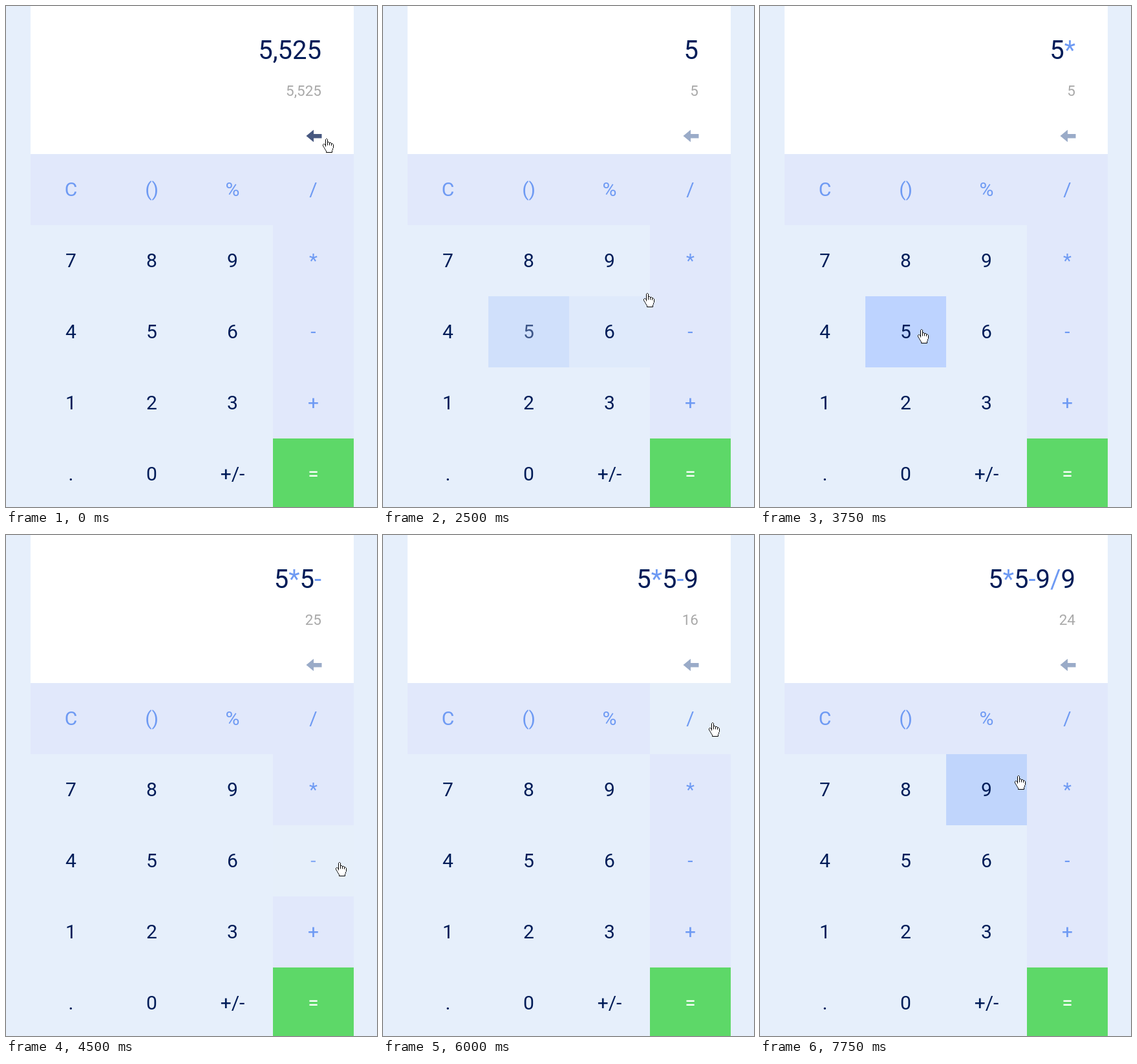
Animation, 574 px wide and 775 px high, one loop 8 s. Source, as an HTML page:

```html
<!DOCTYPE html>
<html lang="en">
<head>
<meta charset="utf-8">
<title>Calculator</title>
<style>
  html, body { margin: 0; width: 100%; height: 100%; overflow: hidden; background: #e6effb; }
  svg { display: block; width: 574px; height: 775px; }
  text { font-family: Roboto, sans-serif; font-size: 30px; fill: #001c58; text-anchor: middle; }
  .op { fill: #6e9af3; }
  .eq { fill: #fff; }
  #expr { font-size: 40px; text-anchor: end; }
  #result { font-size: 22.5px; text-anchor: end; fill: #a9a9a9; }
</style>
</head>
<body>
<svg viewBox="0 0 574 775">
  <path fill="#fff" d="M38 0H538V229H38z"/>
  <text id="expr" x="488" y="82"></text>
  <text id="result" x="488" y="139"></text>
  <path id="back" d="M464.5 201L476 191.5V198H488.5V204.5H476V210.5z"/>
  <g id="keys"></g>
  <g id="hand" stroke="#000" stroke-linejoin="round">
    <path fill="#fff" d="M4.5 12.5V1.5L5.5 .5H6.5L7.5 1.5V5.5H9.5L10.5 6.5H12.5L13.5 7.5H14.5L16.5 9.5V14.5L15.5 15.5V17.5L14.5 18.5V21.5H5.5V19.5L3.5 16.5L2.5 14.5L.5 11.5V9.5L1.5 8.5H2.5L4.5 10.5"/>
    <path fill="none" d="M7.5 5.5V10.5M10.5 6.5V10.5M13.5 7.5V11"/>
  </g>
</svg>
<script>
const NS = 'http://www.w3.org/2000/svg';
const STEP = 250, LOOP = 8000;
const ROWS = [
  ['C', '()', '%', '/'],
  ['7', '8', '9', '*'],
  ['4', '5', '6', '-'],
  ['1', '2', '3', '+'],
  ['.', '0', '+/-', '=']
];
const HOVER = '#bdd3ff', PRESSED = '#c6d9fb', FADING = '#d0e0fc', FAINT = '#dfeafb', LIGHT = '#e6effa';
const ARROW = { idle: '#9aabc8', hover: '#5871a0', down: '#475880' };

// Each entry starts at t and changes only the fields it names.
// lit: key -> [background, label opacity]
const SCRIPT = [
  { t: 0, at: [490, 205], expr: '5,525', result: '5,525', arrow: 'down' },
  { t: 250, arrow: 'hover' },
  { t: 500, expr: '552', result: '552', arrow: 'down' },
  { t: 750, expr: '55', result: '55' },
  { t: 1000, expr: '5', result: '5' },
  { t: 1250, expr: '', result: '0' },
  { t: 1500, arrow: 'hover' },
  { t: 1750, at: [412, 350], arrow: 'idle', lit: { 9: [FAINT, 1] } },
  { t: 2000, at: [246, 500], lit: { 5: [FADING, 1] } },
  { t: 2250, expr: '5', result: '5', lit: { 5: [PRESSED, .8] } },
  { t: 2500, at: [403, 444], lit: { 5: ['#d0e0fb', .7], 6: [FAINT, 1] } },
  { t: 2750, at: [500, 396], lit: { '*': [LIGHT, 1] } },
  { t: 3000, at: [516, 394], expr: '5*', lit: { '*': [LIGHT, .8] } },
  { t: 3250, at: [440, 430], lit: { '*': [LIGHT, .9] } },
  { t: 3500, at: [258, 498], lit: { 5: [FADING, 1] } },
  { t: 3750, at: [244, 500], lit: { 5: [HOVER, 1] } },
  { t: 4000, expr: '5*5', result: '25', lit: { 5: [PRESSED, .8] } },
  { t: 4250, at: [432, 500], lit: { 5: [FADING, .9], 6: [FAINT, 1] } },
  { t: 4500, at: [510, 506], expr: '5*5-', lit: { '-': [LIGHT, .8] } },
  { t: 4750, at: [372, 440], lit: { 9: [FADING, 1], '-': [LIGHT, .9] } },
  { t: 5000, at: [335, 433], expr: '5*5-9', result: '16', lit: { 9: [HOVER, .8] } },
  { t: 5250, lit: { 9: [PRESSED, .82] } },
  { t: 5500, at: [360, 400], lit: { 9: [HOVER, 1] } },
  { t: 5750, at: [446, 326], lit: { 9: [FADING, 1], '/': [LIGHT, 1] } },
  { t: 6000, at: [504, 290], lit: { '/': [LIGHT, 1] } },
  { t: 6250, at: [510, 288] },
  { t: 6500, expr: '5*5-9/', lit: { '/': [LIGHT, .8] } },
  { t: 6750, at: [373, 348], lit: { 9: ['#d1dffc', 1], '/': ['#e4edf9', .9] } },
  { t: 7000, at: [380, 366], lit: { 9: [HOVER, 1] } },
  { t: 7250, at: [386, 372], expr: '5*5-9/9', result: '24', lit: { 9: [PRESSED, .82] } },
  { t: 7500, at: [394, 372], lit: { 9: [PRESSED, .9] } },
  { t: 7750, lit: { 9: ['#c0d5fc', 1] } }
];

const $ = id => document.getElementById(id);

function add(parent, tag, attrs, label = '') {
  const el = document.createElementNS(NS, tag);
  for (const name in attrs) el.setAttribute(name, attrs[name]);
  el.textContent = label;
  return parent.appendChild(el);
}

const keys = {};
ROWS.forEach((row, r) => row.forEach((label, c) => {
  const kind = label === '=' ? 'eq' : r === 0 || c === 3 ? 'op' : 'num';
  const base = { eq: '#5dd868', op: '#e1e8fb', num: '#e6effb' }[kind];
  const x = 38 + c * 125, y = 229 + r * 110;
  const box = add($('keys'), 'rect', { x, y, width: 125, height: 110 });
  const text = add($('keys'), 'text', { x: x + 62.5, y: y + 65, class: kind }, label);
  keys[label] = { box, text, base };
}));

function showExpr(expr) {
  $('expr').textContent = '';
  for (const ch of expr) add($('expr'), 'tspan', '*-/+'.includes(ch) ? { class: 'op' } : {}, ch);
}

function draw(t) {
  const state = Object.assign({}, ...SCRIPT.filter(s => s.t <= t));
  const lit = state.lit || {};
  showExpr(state.expr);
  $('result').textContent = state.result;
  $('back').setAttribute('fill', ARROW[state.arrow]);
  $('hand').setAttribute('transform', `translate(${state.at})`);
  for (const label in keys) {
    const { box, text, base } = keys[label];
    const [fill, opacity] = lit[label] || [base, 1];
    box.setAttribute('fill', fill);
    text.setAttribute('opacity', opacity);
  }
}

let shown = -1;
function tick(now) {
  const step = Math.floor((now % LOOP) / STEP);
  if (step !== shown) draw((shown = step) * STEP);
  requestAnimationFrame(tick);
}
draw(0);
requestAnimationFrame(tick);
</script>
</body>
</html>
```
